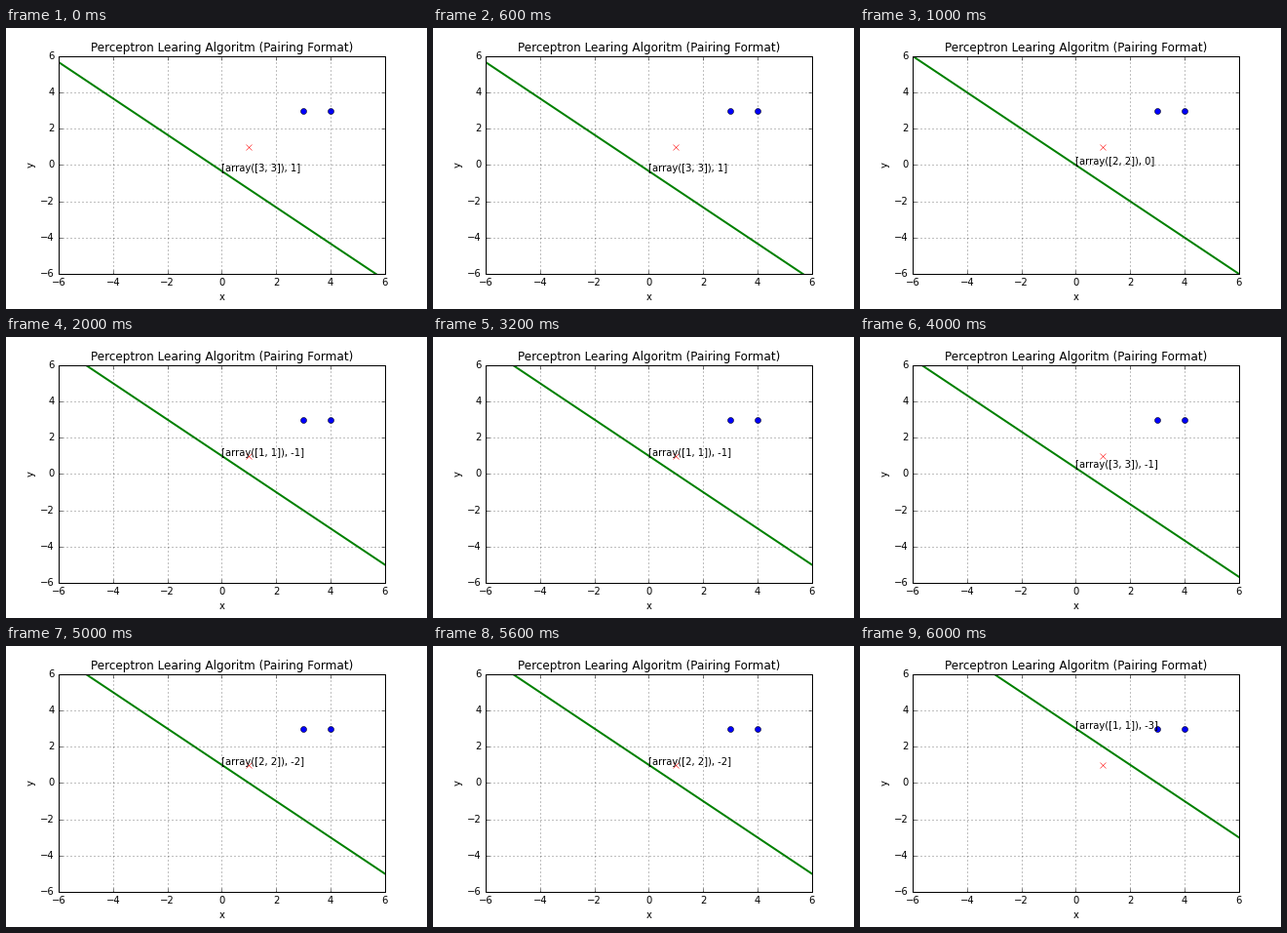
Write a matplotlib script that moves like this. It is 432x288 px and loops after 7000 ms.

```python
import numpy as np
import matplotlib.pyplot as plt
from matplotlib.animation import FuncAnimation

plt.style.use("classic")
plt.rcParams.update({
    "font.family": "DejaVu Sans",
    "font.size": 10,
    "savefig.dpi": "figure",
    "figure.subplot.bottom": 0.125,
})

STEP_MS = 1000
LIMIT = 6
POSITIVE = [(3, 3), (4, 3)]
NEGATIVE = (1, 1)


def train(steps):
    """Weights and bias after each perceptron update."""
    w, b = np.array([3, 3]), 1
    states = []
    for _ in range(steps):
        states.append((w, b))
        if w.any():
            w, b = w - NEGATIVE, b - 1
        else:
            w, b = w + POSITIVE[0], b + 1
    return states


states = train(7)

fig, ax = plt.subplots(figsize=(6, 4), dpi=72, facecolor="white")
ax.set_xlim(-LIMIT, LIMIT)
ax.set_ylim(-LIMIT, LIMIT)
ax.set_title("Perceptron Learing Algoritm (Pairing Format)")
ax.set_xlabel("x")
ax.set_ylabel("y")
ax.grid(True)

for x, y in POSITIVE:
    ax.plot(x, y, "bo")
ax.plot(*NEGATIVE, "rx")

xs = np.array([-LIMIT, LIMIT])
line, = ax.plot([], [], "g", lw=2)
label = ax.text(0, 0, "")


def update(i):
    # Zero weights define no boundary, so the last one stays in view.
    w, b = next(s for s in reversed(states[:i + 1]) if s[0].any())
    line.set_data(xs, -(w[0] * xs + b) / w[1])
    label.set_position((0, -b / w[1]))
    label.set_text(f"[array([{w[0]}, {w[1]}]), {b}]")
    return line, label


anim = FuncAnimation(fig, update, frames=len(states), interval=STEP_MS,
                     init_func=lambda: update(0), repeat=True,
                     repeat_delay=0, blit=False)
plt.show()
```
